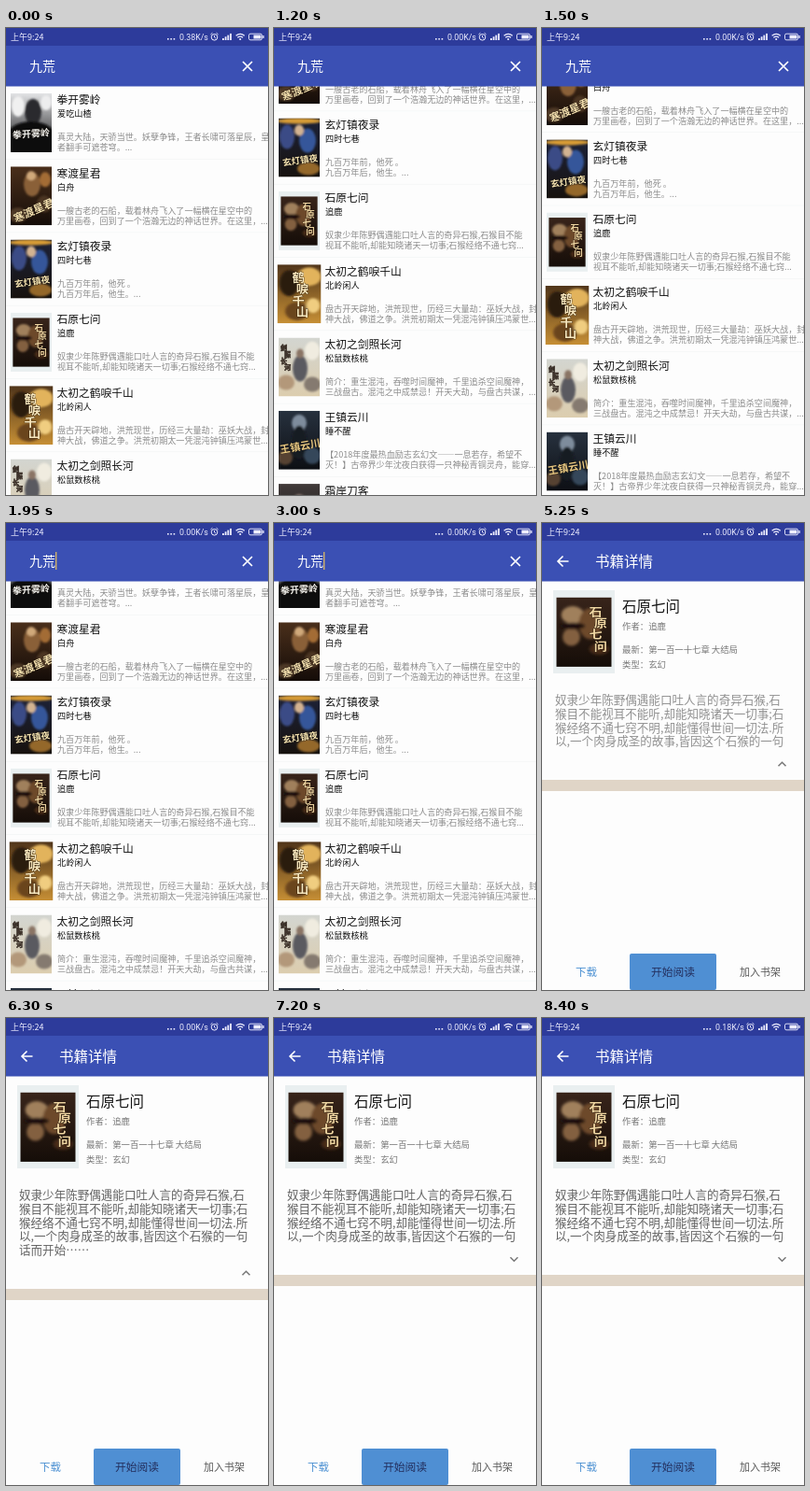
An HTML page for the animation above (8.55 s loop, 281x500 px).

```html
<!DOCTYPE html>
<html lang="zh-CN">
<head>
<meta charset="utf-8">
<title>Book search</title>
<style>
html, body { margin: 0; width: 100%; height: 100%; overflow: hidden; background: #fdfdfd; }
svg { display: block; }
#stage { position: absolute; left: 0; top: 0; }
text { font-family: "Noto Sans CJK SC", "Noto Sans CJK", sans-serif; white-space: pre; }
.latin { font-family: Roboto, sans-serif; }
.brush { font-family: "Noto Serif", "Noto Sans CJK SC", serif; font-weight: 700; }
</style>
</head>
<body>
<svg id="stage" width="281" height="500" viewBox="0 0 281 500"></svg>
<script>
const LOOP = 8550, STEP = 150, PITCH = 78.3;

const books = [
  { title: '拳开雾岭', author: '爱吃山楂',
    lines: ['真灵大陆，天骄当世。妖孽争锋，王者长啸可落星辰，皇', '者翻手可遮苍穹。...'],
    art: { bg: ['#e2e3e5', '#0c0c0e'], blobs: [[24, 20, 9, 14, '#2a2a2e'], [8, 14, 7, 11, '#f0f0f0'], [38, 10, 6, 8, '#ededee'], [22, 50, 28, 20, '#0c0c0e']],
      label: ['拳开雾岭', 2, 43, 10, '#f2f2ee', -4] } },
  { title: '寒渡星君', author: '白舟',
    lines: ['一艘古老的石船，载着林舟飞入了一幅横在星空中的', '万里画卷，回到了一个浩瀚无边的神话世界。在这里，...'],
    art: { bg: ['#4a2f1b', '#140c08'], blobs: [[23, 19, 9, 13, '#8a6038'], [22, 10, 5, 5, '#d0a97a'], [37, 14, 6, 8, '#a36c35'], [8, 52, 10, 8, '#4e3926'], [36, 40, 8, 9, '#4b3522']],
      label: ['寒渡星君', 2, 48, 11.5, '#f3dfae', -24] } },
  { title: '玄灯镇夜录', author: '四时七巷',
    lines: ['九百万年前，他死 。', '九百万年后，他生。...'],
    art: { bg: ['#1d2238', '#17120e'], blobs: [[31, 24, 9, 13, '#34569a'], [9, 20, 8, 13, '#3a4c86'], [22, 13, 5, 6, '#d3b391'], [22, 3, 24, 3, '#d79b35'], [32, 54, 12, 7, '#94682a']],
      label: ['玄灯镇夜', 4, 45, 9.5, '#f8e7b4', -8] } },
  { title: '石原七问', author: '追鹿',
    lines: ['奴隶少年陈野偶遇能口吐人言的奇异石猴,石猴目不能', '视耳不能听,却能知晓诸天一切事;石猴经络不通七窍...'],
    art: { frame: '#e9eff0', bg: ['#38241a', '#150d08'], blobs: [[13, 16, 9, 8, '#a0805c'], [12, 36, 7, 8, '#83603f'], [27, 24, 9, 14, '#6d4a2a'], [34, 47, 8, 5, '#472c18'], [13, 26, 10, 3, '#1a100a']],
      label: ['石原七问', 28, 13, 10.5, '#efd6a2', 0, 'v'] } },
  { title: '太初之鹤唳千山', author: '北岭闲人',
    lines: ['盘古开天辟地，洪荒现世，历经三大量劫：巫妖大战，封', '神大战，佛道之争。洪荒初期太一凭混沌钟镇压鸿蒙世...'],
    art: { wide: 1.5, bg: ['#50351a', '#c68f35'], blobs: [[32, 13, 12, 10, '#e2b35b'], [12, 20, 10, 14, '#2a1a0d'], [20, 50, 12, 10, '#6b451d'], [36, 44, 7, 8, '#f0cd80']],
      label: ['鹤唳千山', 17, 14, 12.5, '#f9e8be', 0, 'v'] } },
  { title: '太初之剑照长河', author: '松鼠数核桃',
    lines: ['简介：重生混沌，吞噬时间魔神，千里追杀空间魔神，', '三战盘古。混沌之中成禁忌！开天大劫，与盘古共谋，...'],
    art: { bg: ['#d3d5d0', '#dccdae'], blobs: [[23, 33, 8, 14, '#5a5a60'], [23, 17, 4, 5, '#8a7565'], [8, 48, 9, 8, '#b3987a'], [36, 50, 9, 8, '#857a70'], [36, 14, 8, 10, '#f0ece0']],
      label: ['剑照长河', 4, 11, 7, '#3d3029', 0, 'v'] } },
  { title: '王镇云川', author: '睡不醒',
    lines: ['【2018年度最热血励志玄幻文——一息若存，希望不', '灭！】古帝界少年沈夜白获得一只神秘青铜灵舟，能穿...'],
    art: { bg: ['#27313e', '#0d0f14'], blobs: [[22, 13, 8, 9, '#7e8c9c'], [22, 34, 8, 18, '#181b22'], [36, 48, 9, 9, '#34465a'], [7, 50, 8, 8, '#574331']],
      label: ['王镇云川', 1, 38, 11, '#e8c983', -10] } },
  { title: '霜岸刀客', author: '半盏灯',
    lines: ['一柄残刀，一身风雪。少年自霜岸走来，问道苍茫。...'],
    art: { bg: ['#413a39', '#141214'], blobs: [[22, 25, 9, 14, '#80706a']],
      label: ['霜岸刀客', 2, 44, 10, '#eeeeee', 0] } }
];

const summary = [
  '奴隶少年陈野偶遇能口吐人言的奇异石猴,石',
  '猴目不能视耳不能听,却能知晓诸天一切事;石',
  '猴经络不通七窍不明,却能懂得世间一切法.所',
  '以,一个肉身成圣的故事,皆因这个石猴的一句',
  '话而开始……'
];

// y is the visual centre of the glyphs
const text = (x, y, size, fill, str, attrs = '') =>
  `<text x="${x}" y="${y + size * .38}" font-size="${size}" fill="${fill}" ${attrs}>${str}</text>`;
const rect = (x, y, w, h, fill, attrs = '') =>
  `<rect x="${x}" y="${y}" width="${w}" height="${h}" fill="${fill}" ${attrs}/>`;
const line = (d, color, width, attrs = '') =>
  `<path d="${d}" fill="none" stroke="${color}" stroke-width="${width}" ${attrs}/>`;

function label([str, x, y, size, fill, turn, dir]) {
  const attrs = 'class="brush" stroke="#1b120a" stroke-width=".5" paint-order="stroke"';
  if (dir === 'v') {
    return [...str].map((ch, i) => text(x + (i % 2 ? 2 : -2), y + i * size, size, fill, ch, attrs)).join('');
  }
  return `<g transform="rotate(${turn} 22 ${y})">${text(x, y, size, fill, str, attrs)}</g>`;
}

function cover(art, id, x, y, w, h) {
  const blobs = art.blobs.map(([cx, cy, rx, ry, fill]) =>
    `<ellipse cx="${cx}" cy="${cy}" rx="${rx}" ry="${ry}" fill="${fill}"/>`).join('');
  const picture = `<linearGradient id="${id}" x2="0" y2="1"><stop stop-color="${art.bg[0]}"/>
    <stop offset="1" stop-color="${art.bg[1]}"/></linearGradient>
    ${rect(0, 0, 44, 63, `url(#${id})`)}<g filter="url(#soft)">${blobs}</g>${label(art.label)}`;
  const box = (inner, bx, by, bw, bh) =>
    `<svg x="${bx}" y="${by}" width="${bw}" height="${bh}" viewBox="0 0 44 63" preserveAspectRatio="none">${inner}</svg>`;
  return art.frame
    ? rect(x, y, w, h, art.frame) + box(picture, x + w * .05, y + h * .085, w * .9, h * .835)
    : box(picture, x, y, w, h);
}

function item(book, i) {
  const { title, author, lines, art } = book, grow = art.wide || 0;
  return `<g transform="translate(0 ${62 + i * PITCH})">
    ${i ? rect(0, 0, 281, .6, '#f1f4f4') : ''}
    ${cover(art, 'cover' + i, 5 - grow, 8, 44 + grow * 2, 63)}
    ${text(54.5, 15, 11.75, '#111', title)}
    ${text(55, 30, 9.2, '#111', author)}
    ${lines.map((s, n) => text(55, 55 + n * 11, 9.1, '#8b8b8b', s)).join('')}</g>`;
}

const header = rect(0, 0, 281, 62.5, '#3b50b4') + rect(0, 0, 281, 19, '#2d3b9b');

const listPage = `<g id="list">${rect(0, 0, 281, 500, '#fdfdfd')}
  <g id="items">${books.map(item).join('')}</g>${header}
  ${text(25, 41, 14, '#fff', '九荒')}
  ${rect(53, 31, 1.4, 19, '#d0b068', 'id="caret"')}
  ${line('M254 36l10 10m0-10l-10 10', '#fff', 1.7)}</g>`;

const hero = books[3];
const detailPage = `<g id="detail">${rect(0, 0, 281, 500, '#fdfdfd')}${header}
  ${line('M28.5 41H17m5.5-5.5L17 41l5.5 5.5', '#fff', 1.6)}
  ${text(57, 41, 15.5, '#fff', '书籍详情')}
  ${cover(hero.art, 'hero', 12, 72, 66, 89)}
  ${text(86, 89, 15.5, '#151515', hero.title)}
  ${text(86, 110, 9.4, '#777', '作者：' + hero.author)}
  ${text(86, 135, 9.4, '#777', '最新：第一百一十七章 大结局')}
  ${text(86, 151.5, 9.4, '#777', '类型：玄幻')}
  <svg id="summary" x="0" y="180" width="281" height="62">
    ${summary.map((s, i) => text(14, 9 + i * 14.9, 12.55, '#636363', s)).join('')}</svg>
  <g id="below">${line('M253.5 256.3l4 4 4-4', '#777', 1.5, 'id="chevron"')}
    ${rect(0, 275, 281, 12, '#e0d5c7')}</g>
  ${text(36, 481, 11.5, '#4b90d2', '下载')}
  ${rect(94, 461, 93, 39, '#4f8fd3', 'rx="2"')}
  ${text(117, 481, 11.75, '#24305f', '开始阅读')}
  ${text(212, 481, 11, '#5a5a5a', '加入书架')}</g>`;

const bars = [0, 1, 2, 3].map(i => rect(232 + i * 2.7, 11 - i * 1.7, 1.8, 2 + i * 1.7, '#eef')).join('');
const dots = [0, 1, 2].map(i => rect(173 + i * 3.3, 11, 1.6, 1.6, '#eef')).join('');
const status = `<g>${text(5, 9.5, 9, '#eef', '上午9:24')}${dots}
  ${text(186, 9.5, 8.8, '#eef', '', 'id="speed" class="latin"')}
  <circle cx="223.5" cy="9.8" r="3.3" fill="none" stroke="#eef" stroke-width="1"/>
  ${line('M223.5 7.8v2.2l1.5 1M219.4 7l2-1.8M227.6 7l-2-1.8', '#eef', .9)}${bars}
  ${line('M246.6 8.2q4.6-3.8 9.2 0M248.3 10.2q2.9-2.3 5.8 0', '#eef', 1.2)}
  <circle cx="251.2" cy="12" r="1.1" fill="#eef"/>
  ${rect(260.5, 6.2, 14, 6.6, 'none', 'rx="1.6" stroke="#eef" stroke-width=".9"')}
  ${rect(265.5, 7.5, 8, 4, '#eef')}${rect(275.4, 8, 1.3, 3, '#eef')}</g>`;

const stage = document.getElementById('stage');
stage.innerHTML = `<filter id="soft"><feGaussianBlur stdDeviation="1.3"/></filter>${listPage}${detailPage}${status}`;

const $ = id => document.getElementById(id);
const [list, items, caret, detail, blurb, below, chevron, speed] =
  ['list', 'items', 'caret', 'detail', 'summary', 'below', 'chevron', 'speed'].map($);
const move = (el, x, y) => el.setAttribute('transform', `translate(${x} ${y})`);
const progress = (t, from, span) => Math.min(1, Math.max(0, (t - from) / span));
const smooth = p => p * p * (3 - 2 * p);

// one drag up the list, then one part of the way back
const scrollAt = t => 130 * smooth(progress(t, 600, 600)) - 88 * smooth(progress(t, 1275, 675));

const OPEN = 5250, CLOSE = 6800, FOLD = 300, EXTRA = 15;

function render(t) {
  move(items, 0, -scrollAt(t));
  caret.style.opacity = t >= 750 && (t - 600) % 1050 < 525 ? 1 : 0;
  speed.textContent = (t < 750 ? '0.38' : t < 8100 ? '0.00' : '0.18') + 'K/s';

  const slide = 1 - (1 - progress(t, 3150, 450)) ** 2;
  move(list, -70 * slide, 0);
  move(detail, 281 * (1 - slide), 0);

  const opening = progress(t, OPEN, FOLD), closing = progress(t, CLOSE, FOLD);
  const extra = EXTRA * (opening - closing);
  const running = t >= CLOSE ? closing : t >= OPEN ? opening : 1;
  blurb.setAttribute('height', 62 + extra);
  blurb.style.opacity = .7 + .3 * running;
  move(below, 0, extra);
  chevron.setAttribute('transform', t >= OPEN && t < CLOSE ? 'rotate(180 257.5 258.3)' : '');
}

function tick() {
  const t = performance.now() % LOOP;
  render(Math.floor(t / STEP) * STEP);
  requestAnimationFrame(tick);
}
tick();
</script>
</body>
</html>
```
